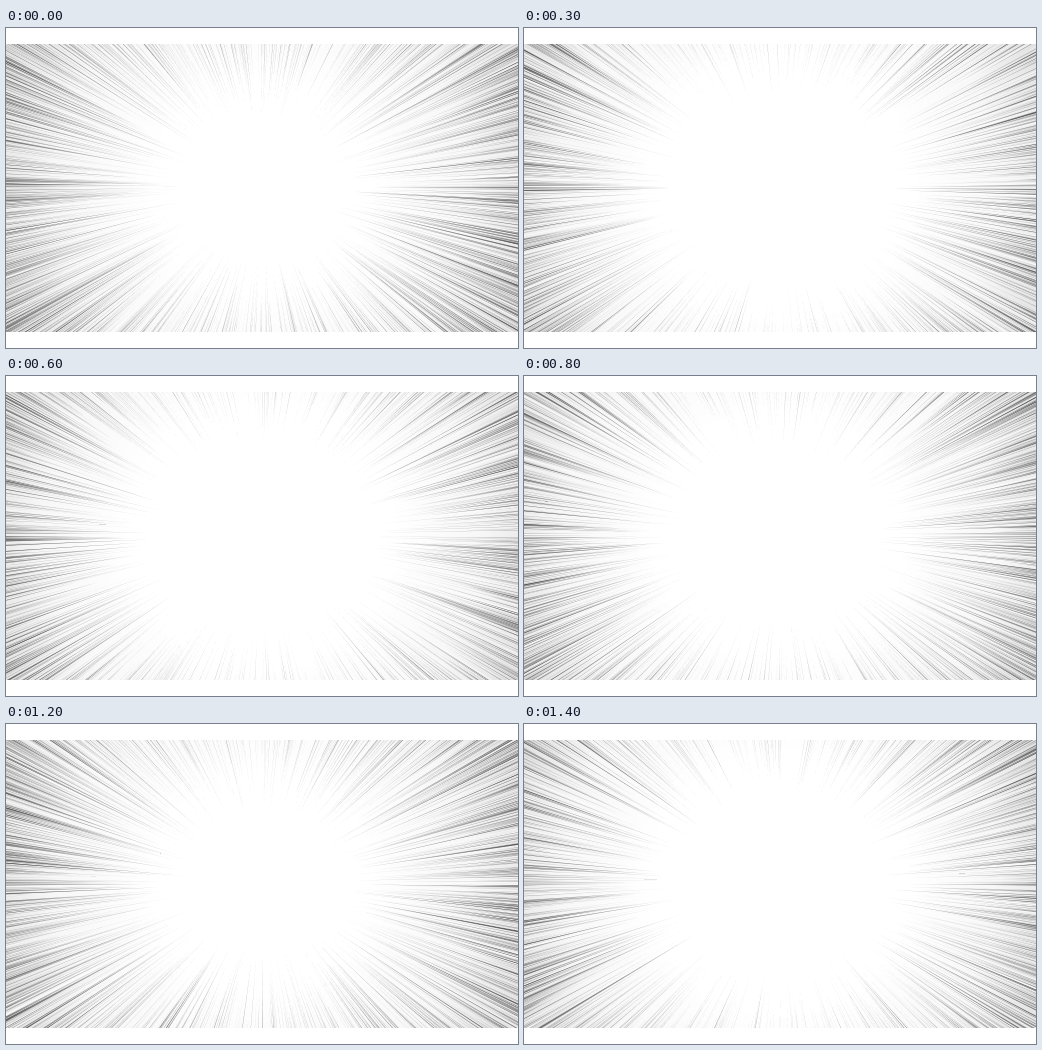
These frames come from a looping animation (512 by 320 pixels, 1.5 s). An HTML page with a canvas:

```html
<!DOCTYPE html>
<html lang="en">
<head>
<meta charset="utf-8">
<title>Speed lines</title>
<style>
  html, body { margin: 0; width: 100%; height: 100%; overflow: hidden; background: #fff; }
  canvas { display: block; }
</style>
</head>
<body>
<canvas id="stage" width="512" height="320"></canvas>
<script>
const W = 512, H = 320, CX = 256, CY = 159;
const BAND = { top: 16, height: 288 };
const STEP = 100;
const LINES = 2600;
const BOLD = 40;
const OUTER = 330;
// radius of the clear centre at each step
const CLEAR = [66, 84, 88, 91, 93, 92, 91, 89, 84, 80, 76, 72, 68, 78, 88];

const ctx = document.getElementById('stage').getContext('2d');

function seeded(seed) {
  let s = seed >>> 0;
  return () => {
    s = (s + 0x6d2b79f5) >>> 0;
    let t = Math.imul(s ^ (s >>> 15), s | 1);
    t ^= t + Math.imul(t ^ (t >>> 7), t | 61);
    return ((t ^ (t >>> 14)) >>> 0) / 4294967296;
  };
}

function radial(from, to, shade, alphas) {
  const g = ctx.createRadialGradient(CX, CY, from, CX, CY, to);
  alphas.forEach((alpha, i) =>
    g.addColorStop(i / (alphas.length - 1), `rgba(${shade},${shade},${shade},${alpha})`));
  return g;
}

// A spike that is pointed at the inner end and widens outwards
function spike(angle, inner, spread) {
  const point = (r, a) => [CX + r * Math.cos(a), CY + r * Math.sin(a)];
  ctx.beginPath();
  ctx.moveTo(...point(inner, angle));
  ctx.lineTo(...point(OUTER, angle - spread));
  ctx.lineTo(...point(OUTER, angle + spread));
  ctx.fill();
}

// Lines crowd together towards the left and right
function sideways(t) {
  return t - 0.14 * Math.sin(2 * t);
}

function draw(step) {
  const rand = seeded(step * 7919 + 101);
  const clear = CLEAR[step];
  const inks = [0.5, 0.75, 1].map(s => radial(clear, 300, 60, [0.6 * s, 0.7 * s, 0.75 * s]));
  const gap = radial(clear, 300, 255, [0.9, 0.8, 0.6]);

  const line = (reach, spread, fill) => {
    const angle = sideways(rand() * Math.PI * 2);
    const stretch = 1 + 0.14 * Math.cos(angle) ** 2;
    ctx.fillStyle = fill;
    spike(angle, (clear + reach) * stretch, spread);
  };

  ctx.fillStyle = '#fff';
  ctx.fillRect(0, 0, W, H);
  ctx.save();
  ctx.beginPath();
  ctx.rect(0, BAND.top, W, BAND.height);
  ctx.clip();

  ctx.fillStyle = radial(clear + 40, 310, 0, [0, 0.03, 0.14]);
  ctx.fillRect(0, 0, W, H);

  for (let i = 0; i < LINES; i++) {
    const reach = 190 * rand() ** 0.85;
    const spread = 0.0005 + 0.0012 * rand() ** 2;
    if (rand() < 0.16) line(reach, spread * 2, gap);
    else line(reach, spread, inks[Math.floor(rand() * 3)]);
  }
  for (let i = 0; i < BOLD; i++) line(70 * rand(), 0.001 + 0.0016 * rand(), inks[1]);
  ctx.restore();
}

let shown = -1;
function tick() {
  const step = Math.floor(performance.now() / STEP) % CLEAR.length;
  if (step !== shown) draw(shown = step);
  requestAnimationFrame(tick);
}
tick();
</script>
</body>
</html>
```
